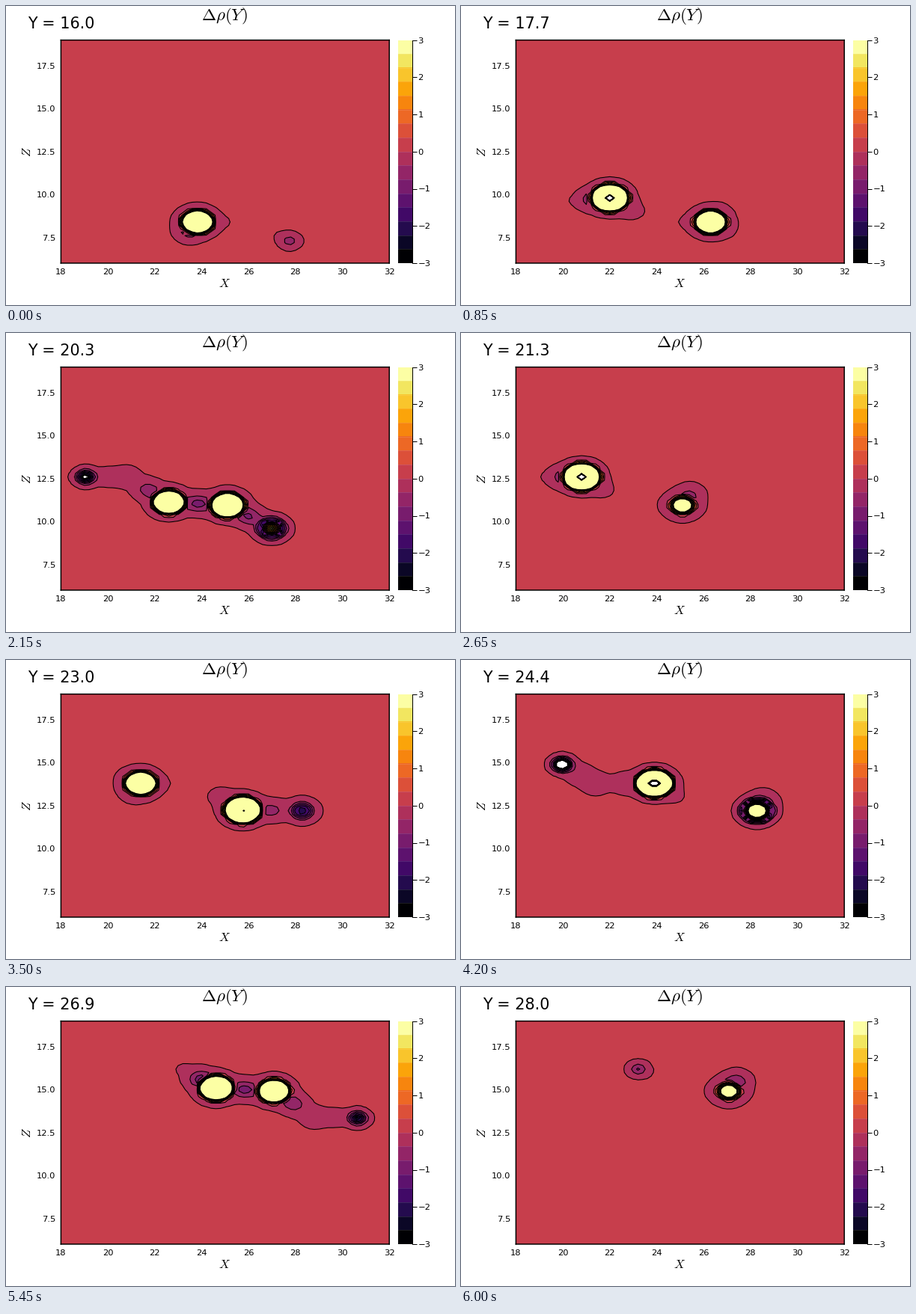
These frames come from a looping animation (600 px wide and 400 px high, 6.05 s). A matplotlib script:

```python
import numpy as np
import matplotlib.pyplot as plt
from matplotlib.animation import FuncAnimation

W, H, DPI = 600, 400, 100
PX = 72 / DPI
FRAMES, STEP = 121, 50

plt.rcParams.update({"font.family": "DejaVu Sans", "mathtext.fontset": "cm"})

# Nuclei as (X, Y, Z)
CARBON = {
    "A": (23.82, 16.42, 8.40), "B": (22.00, 17.70, 9.80),
    "C": (26.30, 17.27, 8.40), "E": (22.60, 19.90, 11.13),
    "F": (20.80, 21.30, 12.60), "G": (25.10, 20.65, 10.95),
    "J": (24.62, 26.57, 15.10), "K": (28.80, 25.90, 13.40),
    "L": (27.08, 27.33, 14.92), "M": (21.40, 23.42, 13.80),
    "P": (23.90, 24.40, 13.80), "Q": (25.75, 22.85, 12.25),
}
NITROGEN = {"D": (26.98, 19.60, 9.60), "I": (28.28, 23.83, 12.20)}
HYDROGEN = {
    "a": (23.10, 14.70, 7.20), "b": (20.25, 16.90, 9.60),
    "c": (27.75, 16.45, 7.30), "f": (19.05, 20.50, 12.60),
    "m": (19.97, 24.40, 14.90), "j": (23.22, 27.58, 16.20),
    "k": (30.65, 26.65, 13.35), "l": (27.75, 29.30, 16.10),
}
BONDS = ("AB AC BE CD DG EG EF FM MP PQ QG QI IK KL LJ JP "
         "Aa Bb Cc Ff Mm Jj Kk Ll").split()
ATOMS = {k: np.array(v) for k, v in {**CARBON, **NITROGEN, **HYDROGEN}.items()}

GX, GZ = np.meshgrid(np.linspace(18, 32, 71), np.linspace(6, 19, 66))
LEVELS = np.linspace(-3, 3, 17)
BANDS = plt.get_cmap("inferno")(np.linspace(0, 1, 16))
FILLS = list(BANDS) + [BANDS[-1]]


def bell(r, width, center=0.0):
    return np.exp(-((r - center) / width) ** 2)


def heavy(r, width):
    """Dense shell with a deep cusp at the nucleus and a faint negative halo."""
    return (10 * np.exp(-(r / width) ** 8) - 4.2 * bell(r, 0.565)
            - 60 * bell(r, 0.1))


def carbon(r):
    return heavy(r, 0.76)


def nitrogen(r):
    return heavy(r, 0.71) - 1.8 * bell(r, 0.11, 0.82)


def hydrogen(r):
    return -5 * bell(r, 0.28) - 1.1 * bell(r, 0.4)


def bond(r):
    return -0.95 * bell(r, 0.47)


SOURCES = [(ATOMS[k], carbon) for k in CARBON]
SOURCES += [(ATOMS[k], nitrogen) for k in NITROGEN]
SOURCES += [(ATOMS[k], hydrogen) for k in HYDROGEN]
SOURCES += [((ATOMS[p] + ATOMS[q]) / 2, bond) for p, q in BONDS]


def density(y):
    rho = np.full(GX.shape, 0.04)
    for (x0, y0, z0), profile in SOURCES:
        if abs(y - y0) < 2:
            rho += profile(np.sqrt((GX - x0) ** 2 + (y - y0) ** 2 + (GZ - z0) ** 2))
    return rho


def box(left, top, right, bottom):
    return [left / W, 1 - bottom / H, (right - left) / W, (bottom - top) / H]


def label(x, y, s, size, **kw):
    return fig.text(x / W, 1 - y / H, s, fontsize=size * PX, **kw)


fig = plt.figure(figsize=(W / DPI, H / DPI), dpi=DPI, facecolor="white")

ax = fig.add_axes(box(73.4, 45.6, 512.2, 344))
ax.set(xlim=(18, 32), ylim=(6, 19), xticks=range(18, 33, 2),
       yticks=np.arange(7.5, 18, 2.5))
ax.tick_params(length=0, labelsize=11.5 * PX)
ax.tick_params(axis="x", pad=7 * PX)
ax.tick_params(axis="y", pad=7 * PX)
for side in ax.spines.values():
    side.set(linewidth=1.5 * PX, snap=False)

bar = fig.add_axes(box(524, 45.5, 542.5, 344))
bar.imshow(BANDS[:, None, :], origin="lower", extent=(0, 1, -3, 3),
           aspect="auto", interpolation="nearest")
bar.hlines(LEVELS[1:-1], 0, 1, colors="white", alpha=0.35,
           linewidth=0.8 * PX, linestyles=(0, (1, 1.5)))
bar.set(xlim=(0, 1), ylim=(-3, 3), xticks=[], yticks=range(-3, 4))
bar.yaxis.tick_right()
bar.tick_params(axis="y", length=6 * PX, width=PX, pad=2 * PX,
                labelsize=11.5 * PX)
for name in ("left", "top", "bottom"):
    bar.spines[name].set_visible(False)
bar.spines["right"].set_linewidth(PX)

label(291.7, 19, r"$\Delta\rho(Y)$", 23, ha="center", va="baseline")
label(292.5, 376.5, "$X$", 16.5, ha="center", va="baseline")
label(28, 195.5, "$Z$", 16.5, ha="center", va="center", rotation=90)
readout = label(29.5, 30.5, "", 20.8, va="baseline")

drawn = []


def update(i):
    while drawn:
        drawn.pop().remove()
    y = 16 + 0.1 * i
    rho = density(y)
    drawn.append(ax.contourf(GX, GZ, rho, levels=LEVELS, colors=FILLS, extend="max"))
    drawn.append(ax.contour(GX, GZ, rho, levels=LEVELS, colors="black",
                            linewidths=1.1 * PX, linestyles="solid"))
    readout.set_text(f"Y = {y:.1f}")
    return [readout]


anim = FuncAnimation(fig, update, frames=FRAMES, init_func=lambda: [],
                     interval=STEP, repeat=True, repeat_delay=0, blit=False)
plt.show()
```
